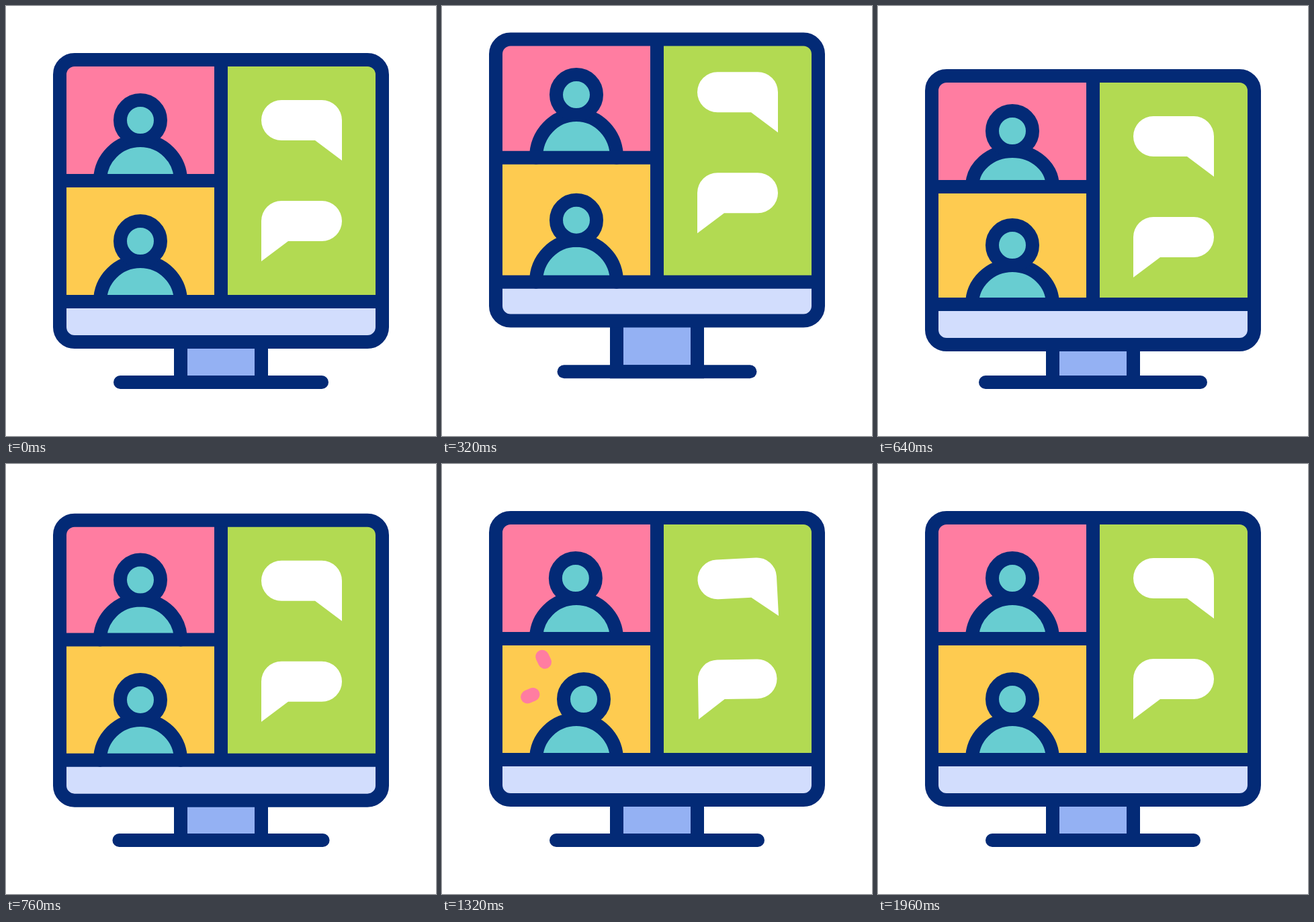
An HTML page that plays this animation: 640x640 px, repeating every 2000 ms.

```html
<!DOCTYPE html>
<html lang="en">
<head>
<meta charset="utf-8">
<title>Video call on a monitor</title>
<style>
  html, body { margin: 0; width: 100%; height: 100%; overflow: hidden; background: #fff; }
  svg { display: block; width: 100%; height: 100%; }
  .line { fill: none; stroke: #032a76; stroke-width: 20; }
  .round { stroke-linecap: round; }
  .pink { fill: #ff7da1; }
  .yellow { fill: #fecb50; }
  .green { fill: #b2da52; }
  .chin { fill: #d2ddfd; }
  .stand { fill: #94b1f3; }
  .skin { fill: #68cdd1; }
  .bubble { fill: #fff; }
  .spark { fill: none; stroke: #ff7da1; stroke-width: 20; stroke-linecap: round; }
</style>
</head>
<body>
<svg viewBox="0 0 640 640">
  <path id="stand" class="line stand"/>
  <path id="base" class="line round"/>
  <path id="pinkPane" class="pink"/>
  <path id="yellowPane" class="yellow"/>
  <path id="greenPane" class="green"/>
  <path id="chinPane" class="chin"/>
  <path id="sparkA1" class="spark"/>
  <path id="sparkA2" class="spark"/>
  <path id="sparkB1" class="spark"/>
  <path id="sparkB2" class="spark"/>
  <path id="body1" class="line round skin"/>
  <circle id="head1" class="line skin" r="30"/>
  <path id="body2" class="line round skin"/>
  <circle id="head2" class="line skin" r="30"/>
  <path id="dividers" class="line"/>
  <rect id="frame" class="line" x="80" width="480" rx="22"/>
  <path id="bubble1" class="bubble" d="M-30-45H30a30 30 0 0 1 30 30V45L20 15H-30a30 30 0 0 1 0-60z"/>
  <path id="bubble2" class="bubble" d="M-30-45H30a30 30 0 0 1 30 30V45L20 15H-30a30 30 0 0 1 0-60z"/>
</svg>
<script>
const LOOP = 2000, STEP = 40;
const el = id => document.getElementById(id);
const set = (id, attrs) => {
  for (const k in attrs) el(id).setAttribute(k, attrs[k]);
};

// Smooth curve through the keys, flat at every turning point and at both ends.
function track(times, values) {
  const n = times.length;
  const rise = i => (values[i + 1] - values[i]) / (times[i + 1] - times[i]);
  const slope = values.map((_, i) => {
    if (i === 0 || i === n - 1) return 0;
    const a = rise(i - 1), b = rise(i);
    return a * b > 0 ? 2 * a * b / (a + b) : 0;
  });
  return t => {
    if (t <= times[0]) return values[0];
    if (t >= times[n - 1]) return values[n - 1];
    const i = times.findIndex(x => x > t) - 1;
    const h = times[i + 1] - times[i], u = (t - times[i]) / h, v = 1 - u;
    return values[i] * (1 + 2 * u) * v * v + slope[i] * h * u * v * v
      + values[i + 1] * u * u * (3 - 2 * u) - slope[i + 1] * h * u * u * v;
  };
}

// Jump: rise, peak, fall, squash, rest
const jump = (...v) => track([80, 200, 300, 440, 640, 800], [0, ...v, 0]);
const top_ = jump(-16, -32, 2.5, 24);
const middle = jump(-21, -35, -17.5, 9);
const bottom = jump(-17, -30, -14, 4);
const edge = jump(-20.5, -32, -17.5, 4);
const foot = jump(-9, -16, -9, 0);
const spread = jump(-9, -12, -1.5, 10);
const person1 = jump(-24, -39, -13, 16);
const person2 = jump(-19, -32, -14, 6);
const chat = jump(-30, -43, -11.5, 24);

// Heads dodge while sparks fly
const dodge1 = track([1280, 1480, 1800, 1960], [0, -11, -11, 0]);
const dodge2 = track([800, 960, 1340, 1500], [0, 11, 11, 0]);
const sparkTip = track([920, 1000, 1160, 1320], [-7, 2.7, 19, 27]);
const sparkTail = track([920, 1000, 1160, 1320, 1400], [-7, -2.7, 4, 18, 27]);

// Bubbles sway
const sway1 = track([800, 1000, 1160, 1320, 1560, 1880], [0, -6, -7, -3, 6, 0]);
const sway2 = track([800, 1000, 1060, 1320, 1560, 1780, 1920], [0, 6, 7, -1, -7, -3, 0]);
const shrink = track([1040, 1320, 1600], [1, 0.98, 1]);

const pane = (x1, y1, x2, y2) => ({ d: `M${x1} ${y1}H${x2}V${y2}H${x1}Z` });

function drawPerson(n, x, y, floor) {
  set("head" + n, { cx: x, cy: y });
  set("body" + n, { d: `M140 ${floor}A60 ${floor - y - 30} 0 0 1 260 ${floor}` });
}

function drawSpark(id, x, y, dx, dy, t) {
  const a = sparkTail(t), b = sparkTip(t);
  const shown = b - a > 0.5;
  set(id, { d: shown ? `M${x + dx * a} ${y + dy * a}L${x + dx * b} ${y + dy * b}` : "M0 0" });
}

function draw(t) {
  const yTop = 80 + top_(t), yMid = 260 + middle(t), yLow = 440 + bottom(t);
  const yEdge = 500 + edge(t), yFoot = 560 + foot(t), half = 150 + spread(t);

  set("stand", { d: `M260 ${yEdge}V${yFoot}H380V${yEdge}` });
  set("base", { d: `M${320 - half} ${yFoot}H${320 + half}` });
  set("pinkPane", pane(80, yTop, 320, yMid));
  set("yellowPane", pane(80, yMid, 320, yLow));
  set("greenPane", pane(320, yTop, 560, yLow));
  set("chinPane", pane(80, yLow, 560, yEdge));
  set("dividers", { d: `M320 ${yTop}V${yLow}M80 ${yMid}H320M80 ${yLow}H560` });
  set("frame", { y: yTop, height: yEdge - yTop });

  drawPerson(1, 200, 170 + person1(t), yMid);
  drawPerson(2, 200, 350 + person2(t), yLow);
  set("head1", { cx: 200 + dodge1(t) });
  set("head2", { cx: 200 + dodge2(t) });

  drawSpark("sparkA1", 161, 311, -0.44, -0.9, t);
  drawSpark("sparkA2", 152, 336, -0.92, 0.39, t);
  drawSpark("sparkB1", 239, 138, 0.44, -0.9, t - 480);
  drawSpark("sparkB2", 248, 163, 0.92, 0.39, t - 480);

  const s = shrink(t), dy = chat(t);
  set("bubble1", { transform: `translate(440 ${185 + dy}) rotate(${sway1(t)}) scale(${s})` });
  set("bubble2", { transform: `translate(440 ${335 + dy}) rotate(${sway2(t)}) scale(${-s} ${s})` });
}

const start = performance.now();
function tick() {
  const t = (performance.now() - start) % LOOP;
  draw(Math.floor(t / STEP) * STEP);
  requestAnimationFrame(tick);
}
tick();
</script>
</body>
</html>
```
